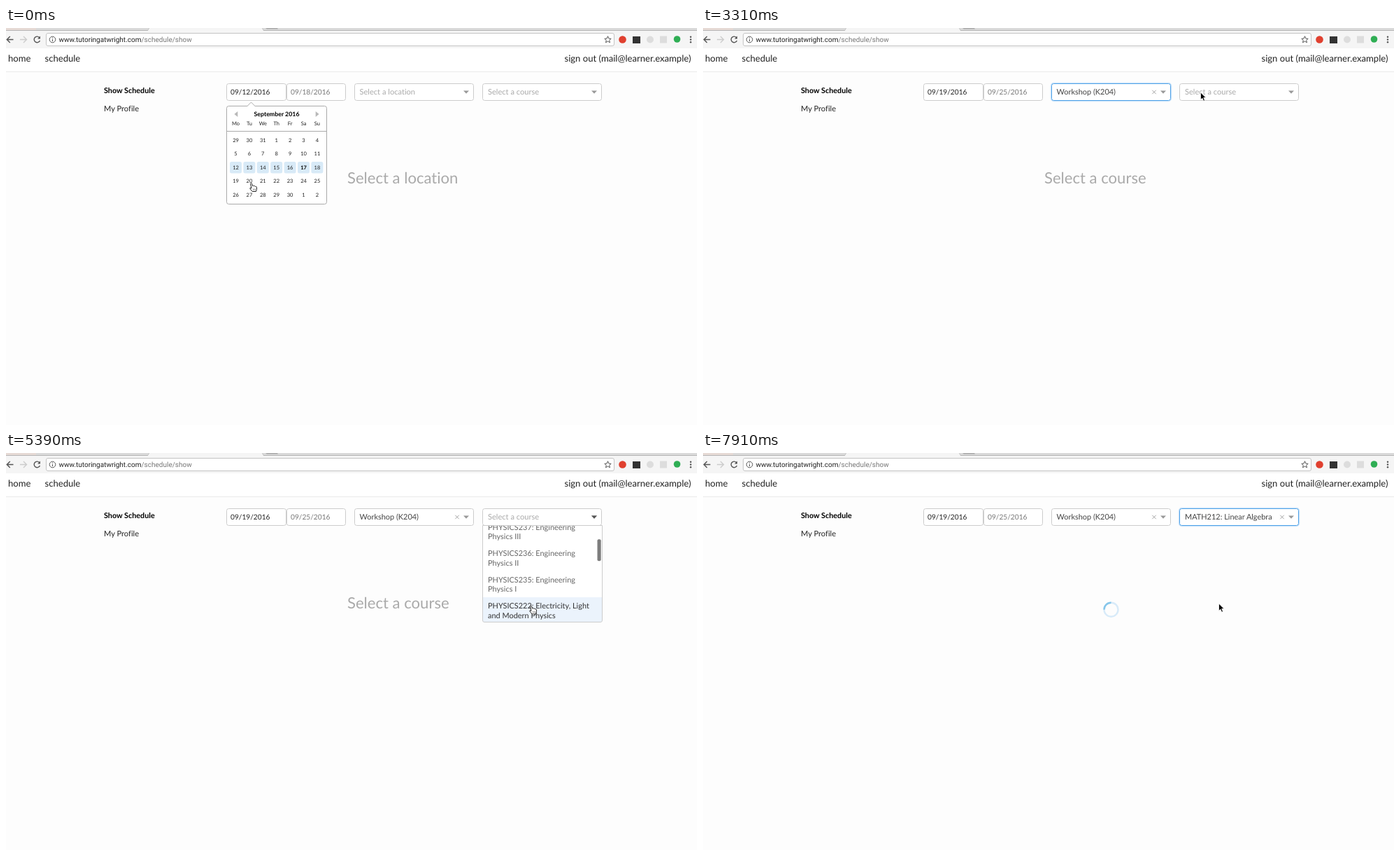
Animation of 988 by 567 pixels, one loop 8000 ms. Source, as an HTML page:

```html
<!DOCTYPE html>
<html lang="en">
<head>
<meta charset="utf-8">
<title>Schedule filter</title>
<style>
  html, body { margin: 0; width: 100%; height: 100%; overflow: hidden; background: #fdfdfd; }
  svg { display: block; width: 988px; height: 567px; }
  text {
    font-family: Lato, sans-serif; font-size: 11.1px; fill: #222; white-space: pre;
    font-variant-ligatures: none; text-rendering: geometricPrecision;
  }
  .url { font-family: Roboto, sans-serif; font-size: 10px; }
  .nav { font-size: 13.1px; }
  .date { font-size: 10.2px; }
  .bold { font-weight: 700; fill: #000; }
  .muted { fill: #777; }
  .hint { fill: #aaa; }
  .headline { font-size: 22.1px; fill: #aaa; }
  .day { font-size: 7.5px; text-anchor: middle; }
  .field { fill: #fff; stroke: #ccc; }
  .glow { fill: none; stroke: #cfe6fb; stroke-width: 3.5; }
  .focus { fill: #fff; stroke: #4b9fe6; }
  .value { fill: #444; font-size: 10.95px; }
  .caret { fill: #999; }
  .caret.dark { fill: #555; }
  .clear { fill: none; stroke: #999; stroke-width: .9; }
  .option rect { fill: #fff; }
  .option text { fill: #666; font-size: 10.95px; }
  .option.hover rect { fill: #ebf3fc; }
  .option.hover text { fill: #333; }
  .icon { fill: none; stroke: #555; stroke-width: 1.4; }
</style>
</head>
<body>
<svg viewBox="0 0 988 567">
  <defs>
    <clipPath id="listClip"><rect x="682" y="104" width="170" height="137"/></clipPath>
    <path id="caret" d="M-4 -2H4L0 2.3Z"/>
    <path id="clear" d="M-2.7 -2.7L2.7 2.7M2.7 -2.7L-2.7 2.7"/>
  </defs>
  <rect width="988" height="567" fill="#fdfdfd"/>

  <!-- browser bar -->
  <rect width="988" height="29" fill="#f5f5f5"/>
  <rect width="988" height="3" fill="#dadada"/>
  <rect width="43" height="3" fill="#e6dad5"/>
  <path d="M0 3.5H203L205 0M366 0L368 3.5H988" fill="none" stroke="#b5b5b5"/>
  <path d="M205 0H366L368 4H203Z" fill="#f5f5f5"/>
  <path d="M371 0H388L389 1.5H373Z" fill="#aaa"/>
  <g class="icon">
    <path d="M10.5 16.5H1.5M5.8 12L1.3 16.5L5.8 21"/>
    <path d="M20 16.5H29.5M25 12L29.5 16.5L25 21" stroke="#ccc"/>
    <path d="M47.6 13.4A4.3 4.3 0 1 0 48.5 18"/>
    <path d="M49 11.5V15.5H45Z" fill="#555" stroke="none"/>
  </g>
  <rect x="57.5" y="7.5" width="812" height="18" rx="2.5" fill="#fff" stroke="#c4c4c4"/>
  <g class="icon" style="stroke-width:1">
    <circle cx="66.5" cy="16.5" r="4.3"/>
    <path d="M66.5 16V19M66.5 13.7V14.8"/>
    <path d="M860.5 11.7L861.9 15L865.2 15.3L862.7 17.5L863.5 20.8L860.5 19L857.5 20.8L858.3 17.5L855.8 15.3L859.1 15Z"/>
  </g>
  <text class="url" x="75.5" y="20">www.tutoringatwright.com<tspan fill="#777">/schedule/show</tspan></text>
  <circle cx="881.5" cy="16.5" r="5.3" fill="#e0402f"/>
  <rect x="896" y="12" width="11" height="10" fill="#333"/>
  <circle cx="921" cy="16.5" r="5" fill="#ddd"/>
  <rect x="935" y="11.5" width="10" height="10" fill="#ddd"/>
  <circle cx="959.5" cy="16" r="4.8" fill="#2fae54"/>
  <g fill="#555"><circle cx="979" cy="12.7" r="1.2"/><circle cx="979" cy="16.5" r="1.2"/><circle cx="979" cy="20.3" r="1.2"/></g>

  <!-- page navigation -->
  <rect y="29" width="988" height="33" fill="#fff"/>
  <path d="M0 62.5H988" stroke="#eaeaea"/>
  <text class="nav" x="3" y="48">home</text>
  <text class="nav" x="55.5" y="48">schedule</text>
  <text class="nav" x="798.5" y="48">sign out (mail@learner.example)</text>
  <text class="bold" x="140" y="92.5" style="font-size:10.8px">Show Schedule</text>
  <text x="140" y="119.3">My Profile</text>

  <!-- dates -->
  <rect class="field" x="315.5" y="79.5" width="85" height="24" rx="3"/>
  <rect class="field" x="401.5" y="79.5" width="84" height="24" rx="3"/>
  <g data-on="0 510">
    <text class="date" x="321" y="95.2">09/12/2016</text>
    <text class="date muted" x="407" y="95.2">09/18/2016</text>
  </g>
  <g data-on="510 8000">
    <text class="date" x="321" y="95.2">09/19/2016</text>
    <text class="date muted" x="407" y="95.2">09/25/2016</text>
  </g>

  <text class="headline" x="488" y="221.5" data-on="0 2580">Select a location</text>
  <text class="headline" x="488" y="221.5" data-on="2580 7620">Select a course</text>
  <g id="spinner" data-on="7620 8000" fill="none" stroke-width="2.4">
    <circle r="10" stroke="#d8ebf9"/>
    <path d="M-10 0A10 10 0 0 1 0 -10" stroke="#86c6ea"/>
  </g>

  <!-- location select -->
  <rect class="field" x="498.5" y="79.5" width="170" height="24" rx="3"/>
  <g data-on="2580 3610">
    <rect class="glow" x="498.5" y="79.5" width="170" height="24" rx="3"/>
    <rect class="focus" x="498.5" y="79.5" width="170" height="24" rx="3"/>
  </g>
  <text class="hint" x="505.5" y="95.3" data-on="0 2580">Select a location</text>
  <g data-on="2580 8000">
    <text class="value" x="505.5" y="95.3">Workshop (K204)</text>
    <use href="#clear" class="clear" x="645" y="91.5"/>
  </g>
  <use href="#caret" class="caret" x="658" y="91.5"/>
  <g data-on="1540 2580">
    <use href="#caret" class="caret dark" x="658" y="91.5"/>
    <g id="places"></g>
    <path d="M498.5 103.5H669.5V152.5H498.5Z" fill="none" stroke="#ccc"/>
  </g>

  <!-- course select -->
  <rect class="field" x="681.5" y="79.5" width="170" height="24" rx="3"/>
  <g data-on="7620 8000">
    <rect class="glow" x="681.5" y="79.5" width="170" height="24" rx="3"/>
    <rect class="focus" x="681.5" y="79.5" width="170" height="24" rx="3"/>
    <text class="value" x="689" y="95.3">MATH212: Linear Algebra</text>
    <use href="#clear" class="clear" x="828" y="91.5"/>
  </g>
  <text class="hint" x="689" y="95.3" data-on="0 7620">Select a course</text>
  <use href="#caret" class="caret" x="841" y="91.5"/>
  <g data-on="3610 7620">
    <use href="#caret" class="caret dark" x="841" y="91.5"/>
    <g clip-path="url(#listClip)">
      <rect x="682" y="104" width="170" height="137" fill="#fff"/>
      <g id="courses"></g>
      <rect id="thumb" x="845.5" width="5.2" height="31" rx="2" fill="#7d7d7d"/>
    </g>
    <path d="M681.5 103.5H852.5V239Q852.5 241.5 850 241.5H684Q681.5 241.5 681.5 239Z" fill="none" stroke="#ccc"/>
  </g>

  <!-- calendar -->
  <g data-on="0 510">
    <rect x="315.5" y="111.5" width="143" height="140" rx="3" fill="#fff" stroke="#aaa"/>
    <path d="M344.5 112L350.5 106L356.5 112" fill="#fff" stroke="#aaa"/>
    <path d="M316 147.5H458" stroke="#aaa"/>
    <path d="M331.3 119V127L326.5 123ZM442.7 119V127L447.5 123Z" fill="#b8b8b8"/>
    <text class="bold" x="387" y="125.7" text-anchor="middle" style="font-size:8.8px">September 2016</text>
    <g id="days"></g>
  </g>

  <g id="arrow">
    <path d="M0 0V10.5L2.4 8.3L4.2 12.3L6 11.5L4.3 7.6H7.6Z" stroke="#fff" stroke-width=".8"/>
  </g>
  <g id="hand">
    <path d="M-1 .8Q0 -.7 1.1 .8L2 4Q3.3 3 4.1 4.2Q5.4 3.5 6.1 4.9Q7.7 4.6 8 6.2L8 8.8L7 12H1.7L-1.5 8.2Q-2.2 6.6 -.4 7L.5 7.6Z" fill="#fff" stroke="#222" stroke-width="1" stroke-linejoin="round"/>
    <path d="M3 8V10.3M4.6 8V10.3M6.1 8V10.3" stroke="#555" stroke-width=".6"/>
  </g>
</svg>
<script>
const LOOP = 8000;
const $ = id => document.getElementById(id);

// Calendar: one column per weekday, five weeks from 29 August.
let days = '';
'Mo Tu We Th Fr Sa Su'.split(' ').forEach((name, col) => {
  const x = 328.5 + col * 19.4;
  days += `<text class="day" x="${x}" y="139.3">${name}</text>`;
  for (let row = 0; row < 5; row++) {
    const n = row * 7 + col - 2;
    const day = n < 1 ? n + 31 : n > 30 ? n - 30 : n;
    const y = 160 + row * 19.5;
    if (row === 2) days += `<rect x="${x - 8.5}" y="${y - 8}" width="17" height="16.5" rx="2.5" fill="#d8eaf7"/>`;
    days += `<text class="day${n === 17 ? ' bold' : ''}" x="${x}" y="${y + 2.6}">${day}</text>`;
  }
});
$('days').innerHTML = days;

// Fills a dropdown; "|" marks a wrapped line.
function fillMenu(id, x, labels) {
  let y = 104;
  $(id).innerHTML = labels.map(label => {
    const lines = label.split('|');
    const height = lines.length > 1 ? 37.5 : 24.5;
    const texts = lines.map((line, i) => `<text x="${x + 7}" y="${y + 16.3 + i * 13.2}">${line}</text>`);
    const html = `<g class="option"><rect x="${x}" y="${y}" width="170" height="${height}"/>${texts.join('')}</g>`;
    y += height;
    return html;
  }).join('');
}
fillMenu('places', 499, ['Reading Corner', 'Workshop (K204)']);
fillMenu('courses', 682, [
  'SPANISH214: Readings in|Literature',
  'SPANISH213: Intermediate|Composition',
  'PHYSICS237: Engineering|Physics III',
  'PHYSICS236: Engineering|Physics II',
  'PHYSICS235: Engineering|Physics I',
  'PHYSICS222: Electricity, Light|and Modern Physics',
  'PHYSICS221: Mechanics,|Waves, and Heat',
  'MATH212: Linear Algebra',
  'MATH209: Calculus III'
]);

// Cursor moves: start, end, number of steps, target x, target y.
const moves = [
  [150, 150, 1, 349, 221.5],
  [510, 1240, 6, 533.5, 90],
  [1840, 2140, 3, 545, 138],
  [2580, 3310, 6, 711.5, 92],
  [3760, 4200, 4, 731, 176],
  [4800, 5390, 5, 750.5, 218],
  [6740, 7030, 3, 739, 216],
  [7180, 7180, 1, 737.5, 215]
];
const hands = [[0, 510], [1990, 2580], [3910, 7620]];
const scrolls = [[0, 0], [4350, 30], [4500, 64], [4650, 84.7], [4800, 85.5],
  [5990, 105], [6140, 128], [6290, 142.5], [6440, 152], [6590, 158], [6740, 162]];
const placeHover = [[0, 0], [2140, 1]];
const courseHover = [[0, 0], [4050, 1], [4200, 2], [4800, 4], [5240, 5], [6140, 6], [6590, 7]];

const held = (track, t) => track.filter(([start]) => t >= start).pop()[1];
const within = (t, [start, end]) => t >= start && t < end;
const ease = p => p * p * (3 - 2 * p);

function cursorAt(t) {
  let x = 350.5, y = 221.5;
  for (const [start, end, steps, toX, toY] of moves) {
    if (t < start) break;
    const gap = (end - start) / (steps - 1) || 1;
    const step = Math.min(steps, Math.floor((t - start) / gap + 0.02) + 1);
    const p = ease(step / steps);
    x += (toX - x) * p;
    y += (toY - y) * p;
  }
  return `translate(${x} ${y})`;
}

function show(el, on) { el.style.display = on ? '' : 'none'; }

function hover(id, index) {
  [...$(id).children].forEach((option, i) => option.classList.toggle('hover', i === index));
}

const timed = [...document.querySelectorAll('[data-on]')]
  .map(el => ({ el, range: el.dataset.on.split(' ').map(Number) }));

function draw(t) {
  timed.forEach(({ el, range }) => show(el, within(t, range)));

  const pointing = hands.some(range => within(t, range));
  show($('hand'), pointing);
  show($('arrow'), !pointing);
  $(pointing ? 'hand' : 'arrow').setAttribute('transform', cursorAt(t));

  hover('places', held(placeHover, t));
  hover('courses', held(courseHover, t));
  const scroll = held(scrolls, t);
  $('courses').setAttribute('transform', `translate(0 ${-scroll})`);
  $('thumb').setAttribute('y', 103 + scroll * 0.238);

  const turn = 47 * (Math.floor((t - 7620) / 145) - 2);
  $('spinner').setAttribute('transform', `translate(583.5 223.7) rotate(${turn})`);
}

const began = performance.now();
function tick() {
  draw((performance.now() - began) % LOOP);
  requestAnimationFrame(tick);
}
tick();
</script>
</body>
</html>
```
